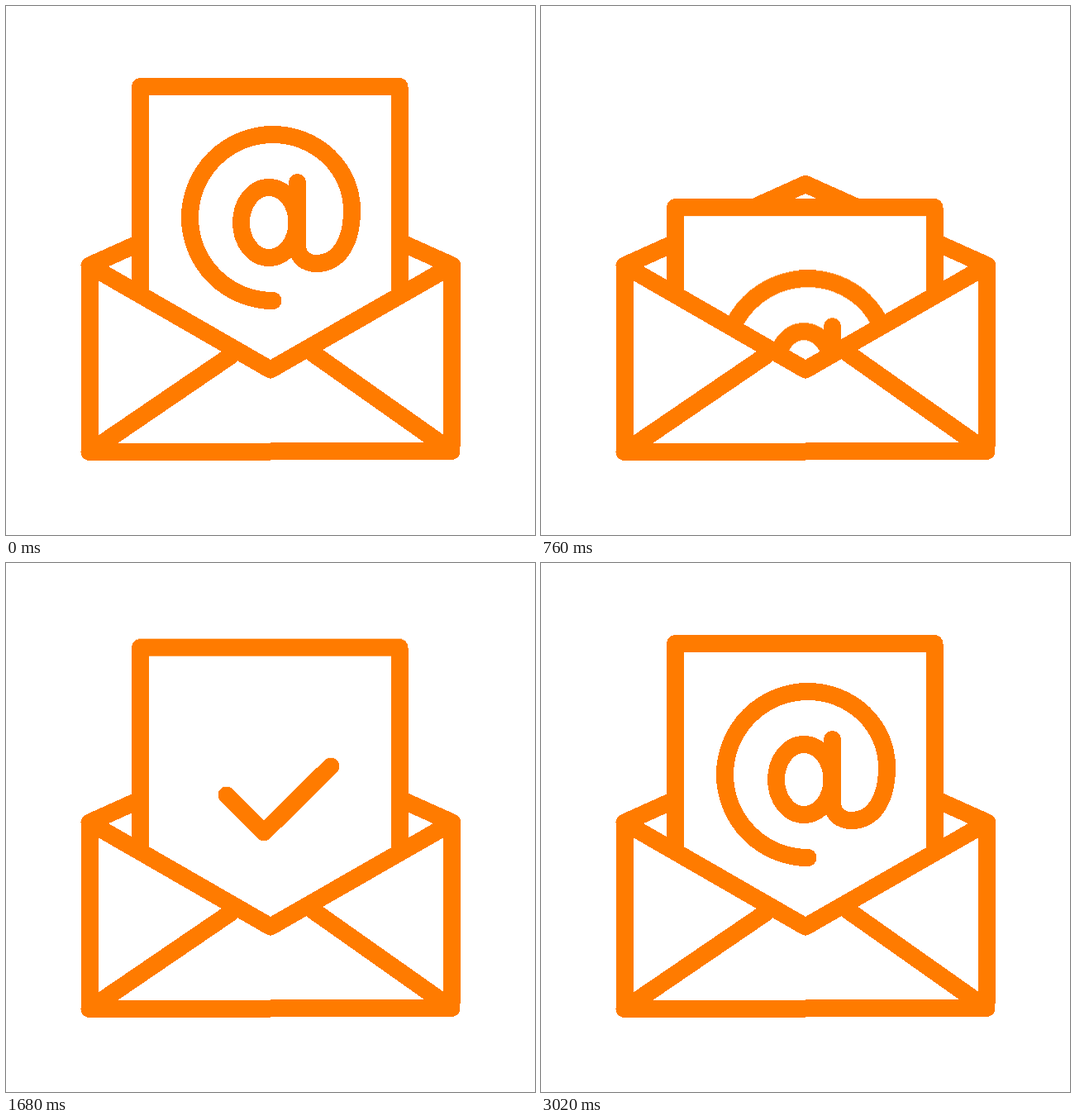
An HTML page for the animation above (3600 ms loop, 640x640 px).

```html
<!DOCTYPE html>
<html lang="en">
<head>
<meta charset="utf-8">
<title>Envelope</title>
<style>
html, body { margin: 0; width: 100%; height: 100%; overflow: hidden; background: #fff; }
svg { display: block; width: 100vw; height: 100vh; shape-rendering: crispEdges; }
svg { fill: none; stroke: #ff7b00; stroke-width: 21; stroke-linecap: round; stroke-linejoin: round; }

.paper { fill: #fff; animation: paper 3.6s infinite; }
.at { animation: at-drop 3.6s infinite, at-show 3.6s step-end infinite; }
.at path { stroke-dasharray: 1 3; animation: at-draw 3.6s infinite; }
.done { animation: done-rise 3.6s infinite; }
.check { stroke-dasharray: 1 3; animation: check-erase 3.6s infinite, check-show 3.6s step-end infinite; }
.rays { animation: rays-show 3.6s step-end infinite; }
.rays path { animation: rays 3.6s infinite; }

/* The sheet dips into the envelope and comes back */
@keyframes paper {
  0% { transform: none; }
  9.444% { transform: translateY(0); animation-timing-function: cubic-bezier(.9, 0, .126, 1); }
  26.111% { transform: translateY(156px); }
  33.417% { transform: translateY(156px); animation-timing-function: cubic-bezier(.9, 0, .2, 1); }
  50.083%, 100% { transform: translateY(0); }
}

@keyframes at-drop {
  0% { transform: translateY(0); }
  8.333% { transform: translateY(0); animation-timing-function: cubic-bezier(.734, 0, .398, 1); }
  30.556% { transform: translateY(300px); animation-timing-function: step-start; }
  31%, 100% { transform: translateY(0); }
}
@keyframes at-show {
  0% { visibility: visible; }
  30.556% { visibility: hidden; }
  70.6%, 100% { visibility: visible; }
}
@keyframes at-draw {
  0%, 30.556% { stroke-dashoffset: 0; animation-timing-function: step-end; }
  50% { stroke-dashoffset: 1; }
  70.556% { stroke-dashoffset: 1; animation-timing-function: cubic-bezier(.79, 0, .8, .8); }
  83.889%, 100% { stroke-dashoffset: 0; }
}

@keyframes done-rise {
  0%, 33.417% { transform: translateY(300px); animation-timing-function: cubic-bezier(.9, 0, .2, 1); }
  51.667%, 100% { transform: translateY(0); }
}
@keyframes check-show {
  0% { visibility: hidden; }
  33.417% { visibility: visible; }
  69.444%, 100% { visibility: hidden; }
}
@keyframes check-erase {
  0% { stroke-dashoffset: 0; }
  57.222% { stroke-dashoffset: 0; animation-timing-function: cubic-bezier(.5, 0, .5, 1); }
  69.444%, 100% { stroke-dashoffset: -1; }
}
@keyframes rays-show {
  0% { visibility: hidden; }
  48.889% { visibility: visible; }
  63.889%, 100% { visibility: hidden; }
}
@keyframes rays {
  0%, 48.889% { stroke-dasharray: 0 9; stroke-dashoffset: 0; animation-timing-function: ease-out; }
  56.111% { stroke-dasharray: .79 9; stroke-dashoffset: 0; }
  56.944% { stroke-dasharray: .79 9; stroke-dashoffset: 0; animation-timing-function: ease-in-out; }
  63.889%, 100% { stroke-dasharray: 0 9; stroke-dashoffset: -1; }
}
</style>
</head>
<body>
<svg viewBox="0 0 640 640">
  <clipPath id="mouth"><path d="M0 0H640V314H540L320 440L101 314H0Z"/></clipPath>

  <path d="M101 314L320 215.5L540 314"/>

  <g clip-path="url(#mouth)">
    <path class="paper" d="M162.5 380V97.5H476V380"/>
    <g class="at">
      <path pathLength="1" d="M323 356.5A100.5 100.5 0 0 1 222.5 256A100.5 100.5 0 0 1 323 155.5A95.5 91.5 0 0 1 418.5 247C418.5 288 401 311.5 376 311.5C361 311.5 352.5 303 352.5 289V213.5"/>
      <path pathLength="1" d="M352 262A33.75 42.5 0 0 1 284.5 262A33.75 42.5 0 0 1 352 262"/>
    </g>
    <g class="done">
      <path class="check" pathLength="1" d="M267 262L312 307L393 227"/>
      <g class="rays">
        <path pathLength="1" d="M285 215L256 176"/>
        <path pathLength="1" d="M318.5 202V142"/>
        <path pathLength="1" d="M354 211L382 173"/>
      </g>
    </g>
  </g>

  <path d="M101 314L320 440L540 314L539 538.5L101 539.5Z"/>
  <path d="M101 539.5L272 423M539 538.5L371 420"/>
</svg>
</body>
</html>
```
